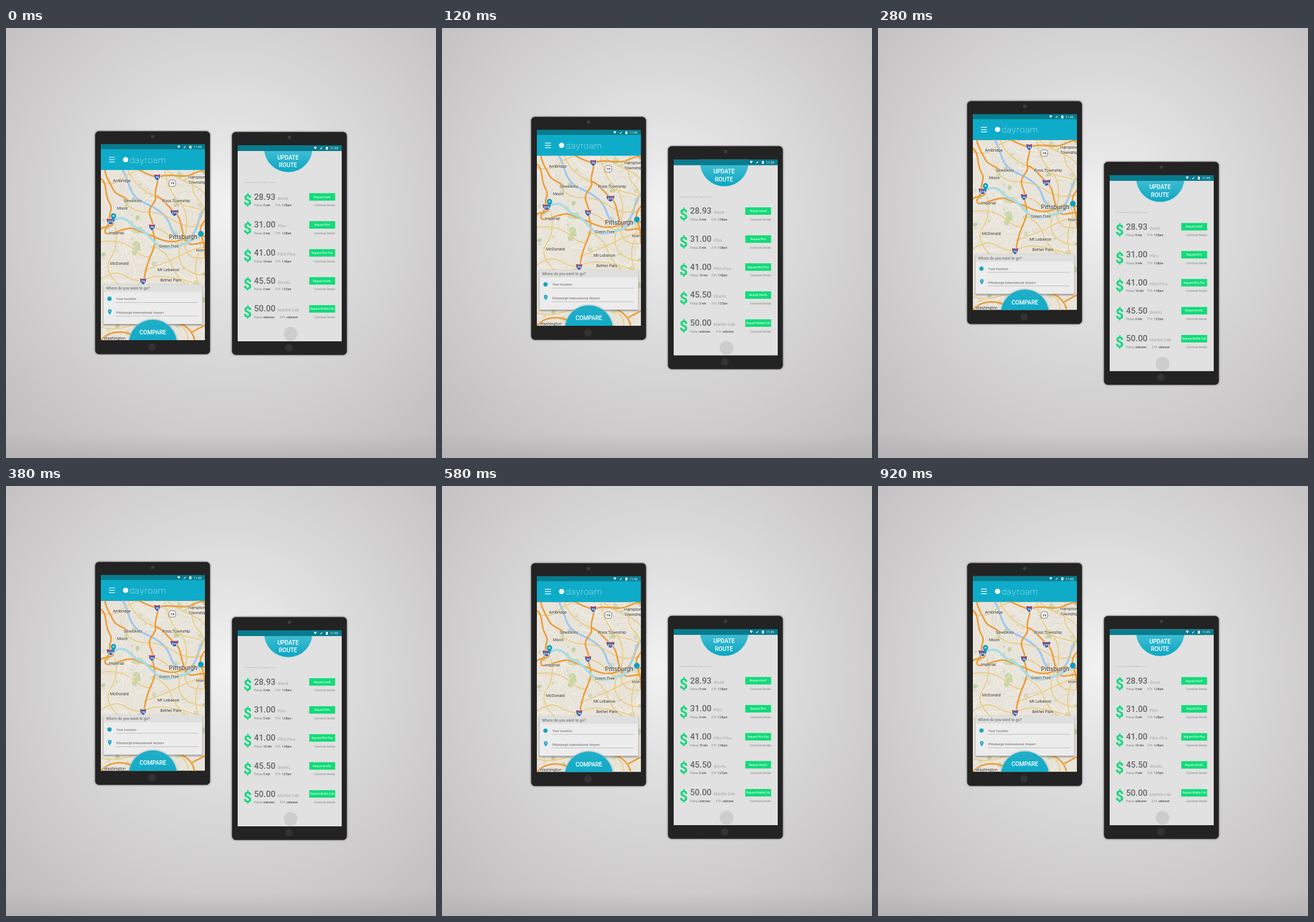
Recreate the animation shown at these times as an HTML page. Size 748x748 px, loop 940 ms.

```html
<!DOCTYPE html>
<html lang="en">
<head>
<meta charset="utf-8">
<title>Two phones</title>
<style>
html, body { margin: 0; width: 100%; height: 100%; overflow: hidden; background: #d2d2d2; }
svg { display: block; width: 100%; height: 100%; }
text { font-family: Roboto, "Open Sans", sans-serif; }
.mid { text-anchor: middle; }
.bold { font-weight: 700; }
.semi { font-weight: 500; }
.road { fill: none; stroke-linejoin: round; stroke-linecap: round; }
.place { font-size: 7.2px; fill: #333; stroke: #f1ede4; stroke-width: 1.2px; paint-order: stroke; }
.field { font-size: 5.85px; font-weight: 600; fill: #8b8b8b; }
.cta { font-size: 10.2px; font-weight: 500; fill: #fff; text-anchor: middle; letter-spacing: -.1px; }
.time { font-size: 5.7px; fill: #fff; }
.tiny { font-size: 4.75px; fill: #858585; }
.tiny .bold { fill: #606060; }
</style>
</head>
<body>
<svg viewBox="0 0 748 748">
  <defs>
    <radialGradient id="wall" gradientUnits="userSpaceOnUse" cx="385" cy="315" r="540">
      <stop offset="0" stop-color="#f2f2f2"/>
      <stop offset=".22" stop-color="#e5e5e5"/>
      <stop offset=".5" stop-color="#d8d7d8"/>
      <stop offset=".75" stop-color="#cccacb"/>
      <stop offset="1" stop-color="#c0bebf"/>
    </radialGradient>
    <linearGradient id="floor" x2="0" y2="1">
      <stop offset="0" stop-color="#aaa" stop-opacity="0"/>
      <stop offset="1" stop-color="#a8a6a6" stop-opacity=".5"/>
    </linearGradient>
    <linearGradient id="drop" x2="0" y2="1">
      <stop offset=".5" stop-color="#45bfd4"/>
      <stop offset="1" stop-color="#0ba6c3"/>
    </linearGradient>
    <linearGradient id="rise" x2="0" y2="1">
      <stop offset="0" stop-color="#22aec7"/>
      <stop offset=".5" stop-color="#0eabc8"/>
    </linearGradient>
    <filter id="soft" x="-10%" y="-10%" width="120%" height="120%"><feGaussianBlur stdDeviation="1.8"/></filter>
    <clipPath id="leftScreen"><rect x="165" y="202" width="181" height="341"/></clipPath>
    <clipPath id="rightScreen"><rect x="403" y="204" width="181" height="341"/></clipPath>
    <g id="body">
      <rect width="201" height="389" rx="7" fill="#555" opacity=".6" filter="url(#soft)"/>
      <rect x=".8" y=".8" width="199.400" height="387.400" rx="6.500" fill="#232323" stroke="#333" stroke-width=".6"/>
      <circle cx="100.500" cy="10" r="3" fill="#3d3d3d"/>
      <circle cx="99.500" cy="376" r="6.600" fill="#333" stroke="#2b2b2b"/>
    </g>
    <g id="status">
      <path d="M-28-1.600Q-25.500-3.600-23-1.600L-25.500 2Z M-17.500 2L-13.500-2.200V-.5L-16 2Z M-7-2h1v-.6h1.500v.6h1v4.600h-3.500Z" fill="#fff"/>
      <text class="time" y="2.200">11:45</text>
    </g>
    <path id="pin" d="M0 5C-1.200 2-3.200.8-3.200-1.500A3.200 3.200 0 0 1 3.200-1.500C3.200.8 1.200 2 0 5Z"/>
  </defs>

  <rect width="748" height="748" fill="url(#wall)"/>
  <rect y="706" width="748" height="42" fill="url(#floor)"/>

  <g id="left">
    <use href="#body" x="154.500" y="179"/>
    <g clip-path="url(#leftScreen)">
      <rect x="165" y="247" width="181" height="296" fill="#e9e4da"/>
      <g id="map"></g>
      <rect x="165" y="202" width="181" height="10" fill="#087c8e"/>
      <rect x="165" y="211" width="181" height="36" fill="#0eacc9"/>
      <use href="#status" x="326" y="207"/>
      <path d="M179 225h10.500M179 229h10.500M179 233h10.500" stroke="#fff" stroke-width="1.200"/>
      <circle cx="208" cy="229" r="4.600" fill="#fff"/>
      <text x="215" y="234.500" fill="#fff" font-size="15.500" font-weight="200" letter-spacing=".6">dayroam</text>

      <rect x="169" y="447" width="173" height="70" fill="#444" opacity=".55" filter="url(#soft)"/>
      <rect x="169.500" y="446" width="172" height="69" fill="#ececec"/>
      <rect x="169.500" y="446" width="172" height="13" fill="#dfdfdd"/>
      <text x="174" y="455" font-size="6.600" font-weight="600" fill="#898989">Where do you want to go?</text>
      <circle cx="180" cy="471" r="3.700" fill="#12a5c1"/>
      <use href="#pin" x="180.500" y="494" fill="#12a5c1"/>
      <circle cx="180.500" cy="492.500" r="1" fill="#ececec"/>
      <text class="field" x="192" y="473.300">Your location</text>
      <text class="field" x="192" y="497">Pittsburgh International Airport</text>
      <path d="M190.500 477.500H334M190.500 501H334" stroke="#b0b0b0" stroke-width=".8"/>
      <circle cx="255.500" cy="549.500" r="43" fill="#555" opacity=".3" filter="url(#soft)"/>
      <circle cx="255.500" cy="549" r="42" fill="url(#rise)" stroke="#a5d9e2" stroke-width=".8"/>
      <text class="cta" x="255.500" y="533">COMPARE</text>
    </g>
  </g>

  <g id="right">
    <use href="#body" x="392.500" y="180.300"/>
    <g clip-path="url(#rightScreen)">
      <rect x="403" y="204" width="181" height="341" fill="#e1e1e1"/>
      <circle cx="491" cy="208.700" r="42.300" fill="url(#drop)" stroke="#b5dce3" stroke-width=".8"/>
      <rect x="403" y="204" width="181" height="10" fill="#087c8e"/>
      <use href="#status" x="563.500" y="209"/>
      <text class="cta" x="490.500" y="228.500">UPDATE</text>
      <text class="cta" x="490.500" y="242">ROUTE</text>
      <text x="413.500" y="270" font-size="4.400" fill="#b4b4b4">Estimated Cost: High to Low</text>
      <g id="fares"></g>
      <circle cx="495" cy="532" r="12" fill="#cdcdcd"/>
    </g>
  </g>
</svg>

<script>
const $ = id => document.getElementById(id);

// Repeatable random numbers
let seed = 29;
const rnd = (lo, hi) => {
  seed = (seed * 16807) % 2147483647;
  return lo + (hi - lo) * seed / 2147483647;
};

const road = (d, color, width) =>
  `<path class="road" d="${d}" stroke="${color}" stroke-width="${width}"/>`;
const cased = (paths, casing, color, width) =>
  paths.map(d => road(d, casing, width + .7)).join('') +
  paths.map(d => road(d, color, width)).join('');

function park(x, y, r, color) {
  let d = '';
  for (let k = 0; k < 7; k++) {
    const a = k * Math.PI * 2 / 7, q = r * rnd(.6, 1.3);
    d += (k ? 'L' : 'M') + (x + q * Math.cos(a)).toFixed(1) + ' ' + (y + q * Math.sin(a)).toFixed(1);
  }
  return `<path d="${d}Z" fill="${color}"/>`;
}

function parks() {
  let out = park(228, 378, 9, '#c8d6a8') + park(222, 391, 6, '#c8d6a8') +
    park(302, 256, 7, '#cbd8ae') + park(232, 352, 6, '#cbd8ae');
  for (let i = 0; i < 45; i++)
    out += park(rnd(165, 346), rnd(250, 540), rnd(2, 6), i % 3 ? '#d2dab9' : '#c0d0a0');
  return out;
}

function lanes() {
  let out = '';
  for (let i = 0; i < 120; i++) {
    let x = rnd(160, 346), y = rnd(245, 543), a = rnd(0, 6.28);
    let d = `M${x.toFixed(1)} ${y.toFixed(1)}`;
    for (let k = 0; k < 6; k++) {
      a += rnd(-.6, .6);
      x += 8 * Math.cos(a);
      y += 8 * Math.sin(a);
      d += `L${x.toFixed(1)} ${y.toFixed(1)}`;
    }
    out += road(d, i % 3 ? '#f8f5ee' : '#d6cfc2', i % 3 ? .8 : .6);
  }
  return out;
}

const minor = [
  'M165 268Q190 275 203 262T240 247',
  'M212 247Q222 270 240 282T280 300T346 318',
  'M276 247Q280 280 300 300T312 362T346 400',
  'M327 247Q318 285 336 300T329 345',
  'M165 372Q200 366 222 385T254 396',
  'M190 347Q196 380 182 400T195 446',
  'M258 380Q280 390 287 410T312 446',
  'M309 366Q294 395 306 412T346 430',
  'M240 422Q280 408 305 395T346 382',
  'M254 346Q275 350 286 365T315 377',
  'M205 300Q218 320 244 320T292 335T346 343',
  'M230 446Q248 430 274 432T335 446',
  'M335 446Q325 420 335 390T324 362',
  'M165 437Q190 420 205 430T238 440',
  'M300 515Q318 527 316 543M165 520Q190 528 220 516',
  'M280 247Q295 260 318 270T346 290'
];
const major = [
  'M165 262C177 270 171 290 180 304S173 325 184 336S166 344 165 350',
  'M172 247C173 258 180 268 186 280S205 292 212 300',
  'M232 247C245 255 258 258 263 260S257 283 260 294S244 310 251 328S254 340 254 346S263 370 256 386S243 415 240 440S231 447 226 455',
  'M180 336C178 346 168 351 174 357S210 343 225 350S245 357 262 365S295 375 312 365S332 367 346 362',
  'M260 292C270 294 280 308 293 320S302 340 310 363S330 372 346 374',
  'M263 260C280 252 304 260 316 257S338 245 346 250',
  'M346 335Q334 348 340 362T346 398',
  'M165 543Q177 529 198 529T228 543',
  'M293 510Q324 520 328 543M325 528L346 517'
];
const river = 'M203 247C213 262 212 277 222 290S244 304 260 314S282 332 287 347S302 365 311 368S331 352 334 340S341 317 346 314';
const route = 'M189 334C199 328 208 331 214 337S223 347 234 351S250 365 262 376S288 382 303 378S321 368 338 362';

function shield(x, y, n) {
  const w = n > 99 ? 7 : 5.3;
  return `<g transform="translate(${x} ${y})">
    <path d="M${-w}-5Q0-3 ${w}-5Q${w + 1.5} 3 0 6.500Q${-w - 1.5} 3 ${-w}-5Z" fill="#35589f" stroke="#fff" stroke-width=".8"/>
    <path d="M${-w}-4.600Q0-3 ${w}-4.600V-2H${-w}Z" fill="#bd5360"/>
    <text class="mid bold" y="3.300" font-size="5.800" fill="#fff">${n}</text></g>`;
}

const place = (x, y, name, size = 7.2) =>
  `<text class="place" x="${x}" y="${y}" style="font-size:${size}px">${name}</text>`;

$('map').innerHTML =
  parks() + lanes() +
  road(river, '#a1c9ef', 3.6) +
  cased(minor, '#e2c37a', '#f5d27a', .9) +
  cased(major, '#d98a2d', '#f4a035', 1.8) +
  road(route, '#a7dce8', 4.2) +
  shield(263, 259, 79) + shield(293, 321, 279) + shield(182, 336, 376) +
  shield(254, 346, 79) + shield(238.5, 440, 79) +
  `<rect x="283.500" y="264.500" width="11.500" height="11" rx="3" fill="#fff" stroke="#555" stroke-width=".8"/>
   <text class="mid bold" x="289.300" y="272.300" font-size="6" fill="#333">19</text>` +
  place(186, 267.5, 'Ambridge') + place(205, 302.5, 'Sewickley') + place(193, 315.5, 'Moon') +
  place(271.5, 302.5, 'Ross Township') + place(317, 262, 'Hampton') + place(317, 271, 'Township') +
  place(179, 359, 'Imperial') + place(283.5, 367.3, 'Pittsburgh', 10.7) + place(266, 382, 'Green Tree') +
  place(330.5, 388.5, 'Home') + place(181, 412, 'McDonald') + place(263.5, 422.5, 'Mt Lebanon') +
  place(268.5, 440.5, 'Bethel Park') + place(170, 541.5, 'Washington') +
  `<use href="#pin" transform="translate(187 329) scale(1.450)" fill="#109fbc"/>
   <circle cx="187" cy="326.800" r="1.500" fill="#e7f3f5"/>
   <circle cx="339" cy="358" r="5" fill="#109fbc"/>`;

const fares = [
  ['28.93', 'dravX', '5 min', '1:30pm'],
  ['31.00', 'Plim', '3 min', '1:28pm'],
  ['41.00', 'Plim Plus', '10 min', '1:40pm'],
  ['45.50', 'dravXL', '2 min', '1:27pm'],
  ['50.00', 'Marble Cab', 'unknown', 'unknown']
];
$('fares').innerHTML = fares.map(([price, name, wait, eta], i) => {
  const etaX = wait === 'unknown' ? 477 : 469;
  return `<g transform="translate(0 ${i * 48.7})">
    <text class="bold" x="413" y="308" font-size="25.500" fill="#12d87b">$</text>
    <text class="semi" x="431.500" y="298.700" font-size="14.600" fill="#666">${price}</text>
    <text class="semi" x="472.500" y="298.700" font-size="7.300" fill="#b2b2b2">${name}</text>
    <text class="tiny" x="431.500" y="310.200">Pickup <tspan class="bold" x="447.500">${wait}</tspan>
      <tspan x="${etaX}">ETA</tspan> <tspan class="bold" x="${etaX + 11}">${eta}</tspan></text>
    <rect x="527.500" y="287.300" width="45" height="13" fill="#12db79"/>
    <text class="mid" x="550" y="295.500" font-size="4.600" fill="#fff">Request ${name}</text>
    <text class="tiny" x="572.500" y="310.200" text-anchor="end">Commute Details</text></g>`;
}).join('');

// Linear travel, then a damped swing around the resting place
const LOOP = 940, STEP = 20, ARRIVE = 220, REST = 45.7;
function travel(ms) {
  if (ms < ARRIVE) return REST * ms / ARRIVE;
  const s = (ms - ARRIVE) / 1000, w = 16.5;
  return REST + REST / ARRIVE * 1000 / w * Math.exp(-7.5 * s) * Math.sin(w * s);
}

const start = performance.now();
function draw() {
  const ms = Math.floor((performance.now() - start) % LOOP / STEP) * STEP;
  const y = travel(ms);
  $('left').setAttribute('transform', `translate(0 ${(-y).toFixed(2)})`);
  $('right').setAttribute('transform', `translate(0 ${(y * .99).toFixed(2)})`);
  requestAnimationFrame(draw);
}
draw();
</script>
</body>
</html>
```
